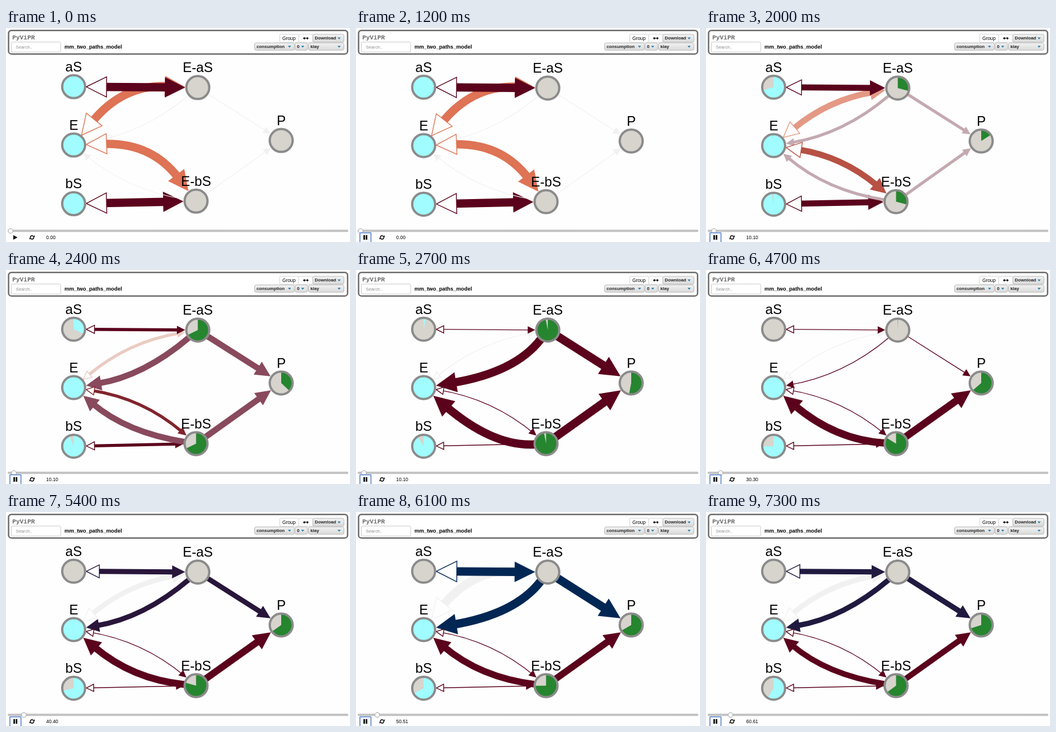
Recreate the animation shown at these times as an HTML page with a canvas. Size 600 px wide and 374 px high, loop 7.4 s.

```html
<!DOCTYPE html>
<html lang="en">
<head>
<meta charset="utf-8">
<title>Network animation</title>
<style>
html, body { margin: 0; width: 100%; height: 100%; overflow: hidden; background: #fefefe; }
canvas { display: block; }
</style>
</head>
<body>
<canvas id="stage" width="600" height="374"></canvas>
<script>
const ctx = document.getElementById('stage').getContext('2d');
const SANS = '"Liberation Sans", Arial, sans-serif';
const MONO = '"Liberation Mono", monospace';

const LOOP = 7400, TICK = 100;
const PLAY = 700;                         // play is pressed
const FIRST = 1700, STEP = 1050, FADE = 1000;

const CYAN = '#a0fcff', GREEN = '#26852f', PAPER = '#fefefe';
const MAROON = [91, 2, 28], NAVY = [0, 39, 84], SALMON = [222, 115, 85], PALE = [241, 241, 241];

// Node: centre, slice colour, slice share at each time point
const nodes = {
  aS: [118, 103.5, CYAN, [1, .025, 0, 0, 0, 0, 0]],
  E: [118, 205.5, CYAN, [1, .993, .993, .993, .993, .993, .993]],
  bS: [118, 308, CYAN, [1, .91, .84, .74, .69, .61, .55]],
  'E-aS': [334.5, 105, GREEN, [0, .97, .04, 0, 0, 0, 0]],
  'E-bS': [331.5, 303.5, GREEN, [0, .97, .92, .83, .765, .68, .59]],
  P: [480, 197.5, GREEN, [0, .53, .597, .64, .66, .69, .72]]
};

const fades = [14.5, 1.4, 1.4, 1.4, 1.4, 1.4, 1.4];
const returns = [14.5, 1.4, 1.4, 1.4, 15, 13.5, 1.4];
const bursts = [1.2, 14.5, 1.4, 1.4, 15, 13.5, 1.4];
const steady = [1.2, 14.5, 14.5, 12.6, 11.8, 11.1, 8];
const allFrom = (first, rest) => [first, rest, rest, rest, rest, rest, rest];
const turning = first => [first, MAROON, MAROON, MAROON, NAVY, NAVY, MAROON];

// Edge: from, to, side of the bend, reversible, widths, colours
const edges = [
  ['E', 'E-aS', 1, true, returns, allFrom(SALMON, PALE)],
  ['E-aS', 'E', 1, false, bursts, turning(PALE)],
  ['E', 'E-bS', 1, true, fades, allFrom(SALMON, MAROON)],
  ['bS', 'E-bS', 0, true, fades, allFrom(MAROON, MAROON)],
  ['E-bS', 'E', 1, false, steady, allFrom(PALE, MAROON)],
  ['aS', 'E-aS', 0, true, returns, turning(MAROON)],
  ['E-aS', 'P', 0, false, bursts, turning(PALE)],
  ['E-bS', 'P', 0, false, steady, allFrom(PALE, MAROON)]
];

const mix = (a, b, p) => a + (b - a) * p;
const clamp = v => Math.max(0, Math.min(1, v));

function text(str, x, y, size, color = '#000', weight = '', family = SANS, align = 'left') {
  ctx.font = `${weight} ${size}px ${family}`;
  ctx.textAlign = align;
  ctx.fillStyle = color;
  ctx.fillText(str, x, y);
}

function box(x, y, w, h, r, fill, stroke, line = 1) {
  ctx.beginPath();
  ctx.roundRect(x, y, w, h, r);
  if (fill) { ctx.fillStyle = fill; ctx.fill(); }
  if (stroke) { ctx.strokeStyle = stroke; ctx.lineWidth = line; ctx.stroke(); }
}

function poly(points, fill) {
  ctx.beginPath();
  points.forEach(([x, y]) => ctx.lineTo(x, y));
  ctx.closePath();
  ctx.fillStyle = fill;
  ctx.fill();
}

// Point at a distance from a towards b
function toward(a, b, dist) {
  const dx = b[0] - a[0], dy = b[1] - a[1], len = Math.hypot(dx, dy);
  return [a[0] + dx / len * dist, a[1] + dy / len * dist];
}

// Moves point p away from a
const away = (p, a, dist) => toward(p, a, -dist);

function arrow(tip, ctrl, size, color, hollow) {
  const base = toward(tip, ctrl, size);
  const hx = (base[1] - tip[1]) / 2, hy = (tip[0] - base[0]) / 2;
  poly([tip, [base[0] + hx, base[1] + hy], [base[0] - hx, base[1] - hy]], hollow ? PAPER : color);
  if (hollow) {
    ctx.strokeStyle = color;
    ctx.lineWidth = 1.4;
    ctx.stroke();
  }
}

function drawEdge([from, to, bend, both, widths, colors], i, j, p) {
  const a = nodes[from], b = nodes[to];
  const w = mix(widths[i], widths[j], p);
  const rgb = colors[i].map((c, n) => Math.round(mix(c, colors[j][n], p)));
  const color = `rgb(${rgb})`;
  const size = .405 * Math.max((9.9 * w) ** .9, 32);

  const dx = b[0] - a[0], dy = b[1] - a[1], len = Math.hypot(dx, dy);
  const off = bend * 33 / len;
  let ctrl = [(a[0] + b[0]) / 2 + dy * off, (a[1] + b[1]) / 2 - dx * off];

  // The long arrows of wide edges push the control point away from their node
  const push = bend * clamp((w - 11) / 3.5) * 38;
  if (both) ctrl = away(ctrl, a, push);
  ctrl = away(ctrl, b, push);

  const gap = Math.min(2 * w, size * .9);
  const tipA = toward(a, ctrl, 22), tipB = toward(b, ctrl, 22);
  const start = toward(a, ctrl, both ? 22 + gap : 20), end = toward(b, ctrl, 22 + gap);

  ctx.beginPath();
  ctx.moveTo(...start);
  ctx.quadraticCurveTo(...ctrl, ...end);
  ctx.strokeStyle = color;
  ctx.lineWidth = w;
  ctx.stroke();
  arrow(tipB, ctrl, size, color, false);
  if (both) arrow(tipA, ctrl, size, color, true);
}

function drawNode(name, [x, y, color, shares], i, j, p) {
  const share = mix(shares[i], shares[j], p);
  const top = -Math.PI / 2;
  ctx.beginPath();
  ctx.arc(x, y, 20, 0, 7);
  ctx.fillStyle = '#d7d4cd';
  ctx.fill();
  if (share > .001) {
    ctx.beginPath();
    if (share < 1) ctx.moveTo(x, y);
    ctx.arc(x, y, 19.5, top, top + share * 2 * Math.PI);
    ctx.fillStyle = color;
    ctx.fill();
  }
  ctx.beginPath();
  ctx.arc(x, y, 20, 0, 7);
  ctx.strokeStyle = '#8b8b8b';
  ctx.lineWidth = 4;
  ctx.stroke();
  text(name, x, y - 27, 23.6, '#000', '', SANS, 'center');
}

function select(label, x, y, w, h) {
  const shade = ctx.createLinearGradient(0, y, 0, y + h);
  shade.addColorStop(0, '#f2f2f2');
  shade.addColorStop(1, '#d9d9d9');
  box(x, y, w, h, 3, shade, '#b9b9b9');
  text(label, x + 3.5, y + h / 2 + 2.4, 7.8, '#222', 'bold');
  const tx = x + w - 8.5, ty = y + h / 2;
  poly([[tx - 2.8, ty - 1.4], [tx + 2.8, ty - 1.4], [tx, ty + 2]], '#2f87b8');
}

function drawHeader() {
  box(4.5, 4.2, 591.3, 41.2, 5, '#fff', '#6c6c6c', 2.5);
  text('PyViPR', 11, 19.5, 10.9, '#6b6b6b', 'bold', MONO);
  box(9.5, 24.5, 86, 17.5, 2, '#fff', '#cccccc');
  text('Search..', 17, 36, 7.8, '#8d8d8d');
  text('mm_two_paths_model', 102, 36, 9.3, '#000', 'bold');

  box(477.5, 11, 33, 14, 2, '#fff', '#d4d4d4');
  text('Group', 482, 21, 8.3);
  box(510.5, 11, 25, 14, 2, '#fff', '#d4d4d4');
  ctx.fillStyle = '#000';
  ctx.fillRect(520, 17.3, 6, 1.3);
  poly([[518, 18], [521, 15.6], [521, 20.4]], '#000');
  poly([[528, 18], [525, 15.6], [525, 20.4]], '#000');
  select('Download', 535, 11, 54.5, 14);
  select('consumption', 433.5, 26, 69.5, 13);
  select('0', 504, 26, 22, 13);
  select('klay', 527.5, 26, 62, 13);
}

function drawReload(x, y) {
  ctx.strokeStyle = '#000';
  ctx.lineWidth = 1.4;
  for (const s of [1, -1]) {
    ctx.beginPath();
    ctx.arc(x, y, 3, s > 0 ? Math.PI : 0, s > 0 ? Math.PI * 1.8 : Math.PI * .8);
    ctx.stroke();
    poly([[x + s * 4.6, y - s * 3.8], [x + s * 4.6, y - s * .4], [x + s * 1.2, y - s * .4]], '#000');
  }
}

function drawPlayer(k, playing) {
  box(3.5, 353.2, 593, 2.6, 1.3, '#d0d0d0', '#9a9a9a', .8);
  ctx.beginPath();
  ctx.arc(8 + 5.8 * k, 354.7, 4.2, 0, 7);
  ctx.fillStyle = '#f8f8f8';
  ctx.fill();
  ctx.strokeStyle = '#a3a3a3';
  ctx.lineWidth = 1;
  ctx.stroke();

  if (playing) {
    box(6.8, 357.8, 19.4, 17, 1, '#f7f8fb', '#6c93d2', 1.8);
    ctx.fillStyle = '#000';
    ctx.fillRect(13, 362, 2.6, 8);
    ctx.fillRect(17, 362, 2.6, 8);
  } else {
    poly([[12.7, 362], [20, 366], [12.7, 370]], '#000');
  }
  drawReload(45.5, 366);
  text((k * 1000 / 99).toFixed(2), 70, 368.7, 8.4);
}

function draw(t) {
  const k = Math.max(0, Math.floor((t - FIRST) / STEP) + 1);
  const p = k ? clamp((t - FIRST - (k - 1) * STEP) / FADE) : 0;
  const prev = Math.max(0, k - 1);
  const playing = t >= PLAY;

  ctx.fillStyle = PAPER;
  ctx.fillRect(0, 0, 600, 374);
  ctx.save();
  if (!playing) ctx.translate(0, -.9);
  edges.forEach(e => drawEdge(e, prev, k, p));
  for (const name in nodes) drawNode(name, nodes[name], prev, k, p);
  ctx.restore();
  drawHeader();
  drawPlayer(k, playing);
}

const begin = performance.now();
function loop() {
  const t = (performance.now() - begin) % LOOP;
  draw(Math.floor(t / TICK) * TICK);
  requestAnimationFrame(loop);
}
loop();
</script>
</body>
</html>
```
